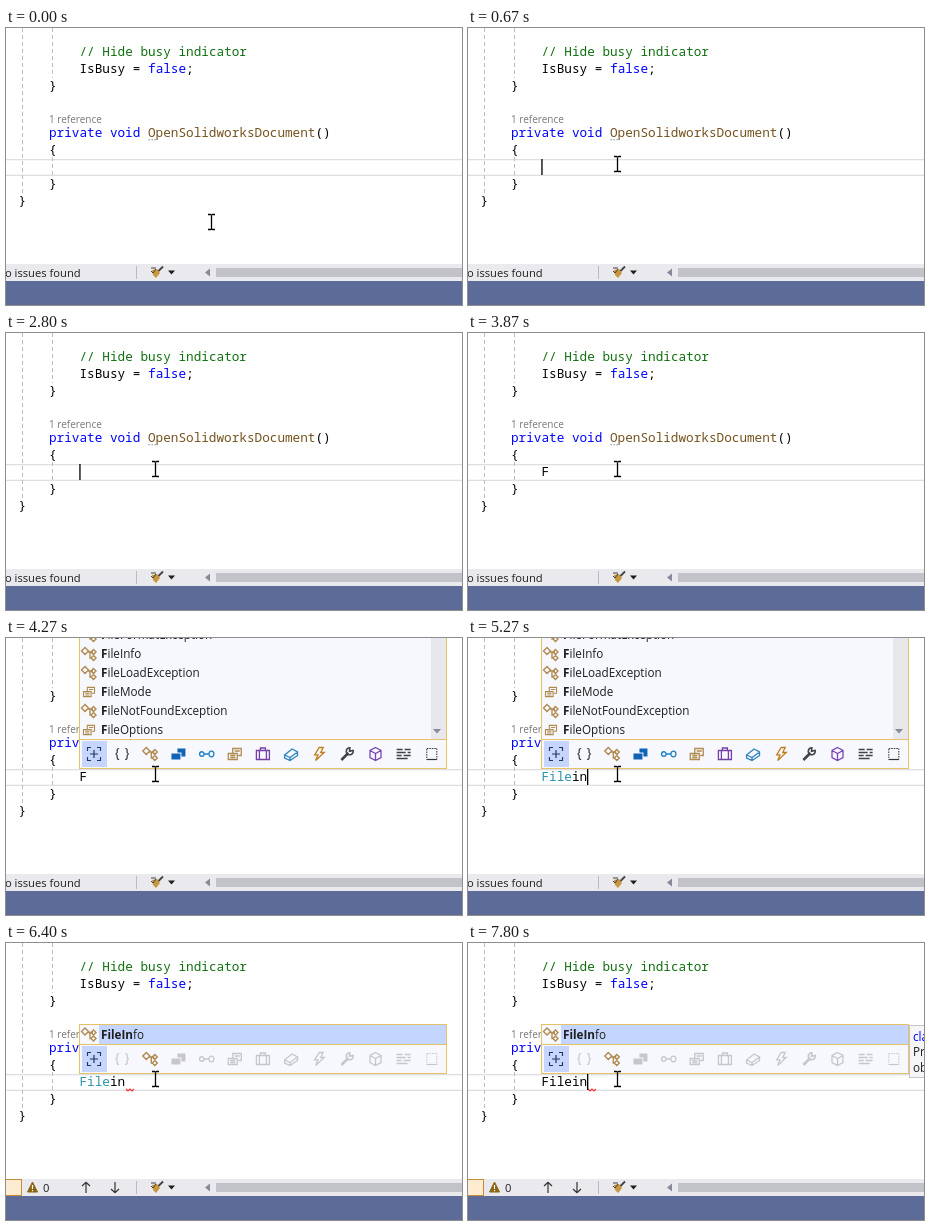
Recreate the animation shown at these times as an HTML page. Size 456x277 px, loop 8000 ms.

```html
<!DOCTYPE html>
<html lang="en">
<head>
<meta charset="utf-8">
<title>Code editor completion</title>
<style>
  html, body { margin: 0; width: 100%; height: 100%; overflow: hidden; background: #fff; }
  svg { display: block; position: absolute; left: 0; top: 0; }
  text { white-space: pre; }
  .code { font: 500 12.7px "Noto Sans Mono", "DejaVu Sans Mono", monospace; fill: #000; }
  .ui { font: 11.7px "Open Sans", "Noto Sans", sans-serif; fill: #1e1e1e; }
  .lens { font-size: 10px; fill: #777; }
  .status { font-size: 11.2px; }
  .kw { fill: #00f; }
  .fn { fill: #74531f; }
  .type { fill: #2b91af; }
  .note { fill: #107010; }
  .hit { font-weight: 700; }
</style>
</head>
<body>
<svg id="stage" width="456" height="277" viewBox="0 0 456 277" xmlns="http://www.w3.org/2000/svg"></svg>
<script>
const LOOP = 8000, TICK = 200 / 3;
const GOLD = '#e5c365', TAN = '#b08a4e', DIM = '#c6c6cc', PALE = '#f7f8fd';

const rect = (x, y, w, h, fill, more = '') =>
  `<rect x="${x}" y="${y}" width="${w}" height="${h}" fill="${fill}" ${more}/>`;
const text = (x, y, body, cls) => `<text x="${x}" y="${y}" class="${cls}">${body}</text>`;
const span = (cls, body) => `<tspan class="${cls}">${body}</tspan>`;
const path = (d, fill, stroke = 'none', width = 1) =>
  `<path d="${d}" fill="${fill}" stroke="${stroke}" stroke-width="${width}"/>`;
const line = (d, color = 'currentColor', width = 1.2) => path(d, 'none', color, width);
const solid = d => path(d, 'currentColor');
const group = (id, body) => `<g id="${id}" display="none">${body}</g>`;

// Icons are centred on 0,0 and coloured through currentColor
const icons = {
  all: line('M0-4V4M-4 0H4') + line('M-6.5-3V-6.5H-3M3-6.5H6.5V-3M6.5 3V6.5H3M-3 6.5H-6.5V3', 'currentColor', 1.1),
  braces: line('M-3-5.5Q-5-5.5-5-3.5V-1.5L-6.2 0L-5 1.5V3.5Q-5 5.5-3 5.5M3-5.5Q5-5.5 5-3.5V-1.5L6.2 0L5 1.5V3.5Q5 5.5 3 5.5'),
  cls: line('M-4-6.5L-.5-3L-4 .5L-7.5-3ZM-1.5-2H4M1-2V4H3M4.5-4.5L7-2L4.5 .5L2-2ZM4.5 1.5L7 4L4.5 6.5L2 4Z', 'currentColor', 1.4),
  struct: solid('M-1-5.5H7V2.5H3V-1.5H-1Z') + solid('M-7-.5H2V5.5H-7Z'),
  iface: line('M-2.5 0H2.5M-7 0A2.2 2.2 0 1 1-2.5 0A2.2 2.2 0 1 1-7 0M2.5 0A2.4 2.4 0 1 1 7.2 0A2.4 2.4 0 1 1 2.5 0', 'currentColor', 1.3),
  enums: line('M-2-1V-5.5H6.5V1.5H3.5M0-3H5M-6.5-.5H2.5V5.5H-6.5ZM-4.5 1.5H.5M-4.5 3.5H.5', 'currentColor', 1.3),
  module: line('M-6.5-3.5H6.5V5.5H-6.5ZM-2.5-3.5V-6H2.5V-3.5M-3.5-3V5M3.5-3V5', 'currentColor', 1.3),
  field: line('M-6.5 1L1-5L6.5-2V1.5L-1 6.5L-6.5 4ZM-6.5 1L-1 3.5L6.5-2M-1 3.5V6.5', 'currentColor', 1.3),
  event: line('M0-6.5H4L1.5-1.5H5L-3.5 6.5L-1.2 .8H-4.5Z', 'currentColor', 1.3),
  prop: line('M-6 6L1-1', 'currentColor', 2.6) + line('M5.8-3.5A3.5 3.5 0 1 1 2.5-6.2L2.2-2.8Z', 'currentColor', 1.6),
  method: line('M0-6.5L5.5-3.5V3.5L0 6.5L-5.5 3.5V-3.5ZM-5.5-3.5L0-.5L5.5-3.5M0-.5V6.5', 'currentColor', 1.3),
  word: line('M-7-4.5H-1M1-4.5H7M-7-1.5H2M4-1.5H7M-7 1.5H-2M0 1.5H7M-7 4.5H4', 'currentColor', 1.3),
  snip: `<rect x="-5" y="-5.5" width="10" height="11" fill="none" stroke="currentColor" stroke-dasharray="1.5 1"/>` + line('M-5 5.5H5')
};
const icon = (name, x, y, color, size = 1) =>
  `<g color="${color}" transform="translate(${x} ${y}) scale(${size})">${icons[name]}</g>`;

const tools = [
  ['all', '#20375f'], ['braces', '#3c3c3c'], ['cls', TAN], ['struct', '#1063b5'], ['iface', '#1a7fc4'],
  ['enums', TAN], ['module', '#7440a8'], ['field', '#2f83bd'], ['event', '#bf7d1c'], ['prop', '#424242'],
  ['method', '#7b45b5'], ['word', '#424242'], ['snip', '#333']
];

function toolbar(live) {
  return rect(73.5, 101.5, 367, 29, PALE, `stroke="${GOLD}"`) +
    rect(76, 103, 25, 26, '#c6d5fb') +
    tools.map(([name, color], i) =>
      icon(name, 88 + i * 28.15, 116, live.includes(name) ? color : DIM)).join('');
}

function row(name, kind, y, hits) {
  return icon(kind, 83, y, TAN, kind === 'cls' ? 1 : .85) +
    text(95, y + 4, span('hit', name.slice(0, hits)) + name.slice(hits), 'ui');
}

const rows = [['FileFormatException', 'cls'], ['FileInfo', 'cls'], ['FileLoadException', 'cls'],
  ['FileMode', 'enums'], ['FileNotFoundException', 'cls'], ['FileOptions', 'enums']];

const fullList = rect(73.5, -1.5, 367, 103, PALE, `stroke="${GOLD}"`) +
  rows.map(([name, kind], i) => row(name, kind, -3 + i * 19, 1)).join('') +
  rect(425, 0, 15, 101, '#e8e8ec') + path('M427 91H435L431 95.5Z', '#868999') +
  toolbar(tools.map(t => t[0]));

const shortList = rect(73.5, 81.5, 367, 20, PALE, `stroke="${GOLD}"`) +
  rect(93, 82, 347, 19, '#c4d5ff') + row('FileInfo', 'cls', 91.5, 6) + toolbar(['all', 'cls']);

const tip = rect(441.5, 82.5, 40, 52, '#f5f5f8', 'stroke="#c3c4d0"') +
  text(445, 98, 'class', 'ui kw') + text(445, 113, 'Provides', 'ui') + text(445, 128.5, 'objects', 'ui');

const guides = ['M16.5 0V165', 'M46.5 0V50', 'M46.5 129V149'].map(d =>
  `<path d="${d}" stroke="#bdbdbd" stroke-dasharray="4 3" fill="none"/>`).join('');

const code = [
  [73.5, 28, span('note', '// Hide busy indicator')],
  [73.5, 45, 'IsBusy = ' + span('kw', 'false') + ';'],
  [43, 61.5, '}'],
  [43, 109, span('kw', 'private void ') + span('fn', 'OpenSolidworksDocument') + '()'],
  [43, 126, '{'], [43, 159.5, '}'], [12.5, 176.5, '}']
].map(([x, y, body]) => text(x, y, body, 'code')).join('');

const broom = line('M157 238.5L152 243.5', '#424242', 1.8) +
  path('M146 242L151 241L154 245L150 250L147 247Z', '#c8963c') +
  line('M145 240H150M145 243L147 245L150 241', '#424242', 1) + path('M162 242.5H169L165.5 246.5Z', '#1e1e1e');

const statusBar = rect(0, 236, 456, 17, '#e9e9ee') + rect(0, 253, 456, 24, '#5d6b99') +
  rect(130, 238, 1, 13, '#b9bac4') + broom +
  path('M204 240.5V248.5L199 244.5Z', '#868999') + rect(210, 240, 246, 9, '#c2c3c9');

const arrow = (x, dir) => line(`M${x} 239V250M${x - 4} ${244.5 + dir * 1.5}L${x} ${244.5 + dir * 5.2}L${x + 4} ${244.5 + dir * 1.5}`, '#333');
const warnings = rect(-2, 236.5, 17.5, 16, '#fdebd2', 'stroke="#c98b35"') +
  path('M26.5 239L31.5 249H21.5Z', '#8a6414', '#8a6414') + line('M26.5 242V246M26.5 247V248.2', '#fff') +
  text(37, 249, '0', 'ui status') + arrow(80, -1) + arrow(109, 1);

const beam = line('M0-7V7M-3.5-7.5H-1L0-6.8L1-7.5H3.5M-3.5 7.5H-1L0 6.8L1 7.5H3.5', '#000', 1.3);

const stage = document.getElementById('stage');
stage.innerHTML = rect(0, 0, 456, 277, '#fff') +
  rect(0, 131, 456, 1.3, '#dedee4') + rect(0, 146.7, 456, 1.3, '#dedee4') +
  guides + text(43, 95, '1 reference', 'ui lens') + code +
  [143, 146, 149].map(x => rect(x - .5, 111, 1.3, 1.3, '#9a9a9a')).join('') +
  statusBar +
  group('clean', text(-9.5, 249, 'No issues found', 'ui status')) + group('warn', warnings) +
  `<text x="73.5" y="143" class="code"><tspan id="head"></tspan><tspan id="tail"></tspan></text>` +
  group('wave', line('M120 146L122 148L124 146L126 148L128 146', '#f03030', 1.1)) +
  group('full', fullList) + group('short', shortList) + group('tip', tip) +
  `<rect id="caret" y="131" width="1.3" height="16" fill="#000"/><g id="mouse">${beam}</g>`;

const part = id => document.getElementById(id);
const [clean, warn, head, tail, wave, full, short, hint, caret, mouse] =
  ['clean', 'warn', 'head', 'tail', 'wave', 'full', 'short', 'tip', 'caret', 'mouse'].map(part);

const typed = [[0, 0], [3330, 1], [4400, 2], [4670, 4], [5000, 5], [5200, 6]];
const blink = [[0, 0], [670, 1], [1200, 0], [1730, 1], [2270, 0], [2800, 1], [3870, 0],
  [4400, 1], [6130, 0], [6600, 1], [7270, 0], [7800, 1]];
const at = (steps, t) => steps.reduce((value, [start, v]) => t >= start ? v : value, 0);
const show = (el, on) => el.setAttribute('display', on ? 'inline' : 'none');

function render(t) {
  const step = t < 70 ? 0 : Math.min(9, Math.floor((t - 70) / TICK) + 1);
  const p = step / 9, ease = p * p * (3 - 2 * p);
  mouse.setAttribute('transform', `translate(${205.5 - 56 * ease} ${194 - 58 * ease})`);

  const count = at(typed, t), word = 'Filein'.slice(0, count);
  head.textContent = word.slice(0, 4);
  tail.textContent = word.slice(4);
  head.setAttribute('class', t >= 5270 && t < 6530 ? 'type' : '');
  caret.setAttribute('x', 73.3 + count * 7.62);
  show(caret, at(blink, t));

  show(full, t >= 4270 && t < 6400);
  show(short, t >= 6400);
  show(wave, t >= 5600);
  show(clean, t < 5730);
  show(warn, t >= 5730);
  show(hint, t >= 6870);
  hint.setAttribute('opacity', at([[6870, .35], [6940, .7], [7070, 1]], t));
}

const begin = performance.now();
function frame(now) {
  render(Math.max(0, now - begin) % LOOP);
  requestAnimationFrame(frame);
}
render(0);
requestAnimationFrame(frame);
</script>
</body>
</html>
```
